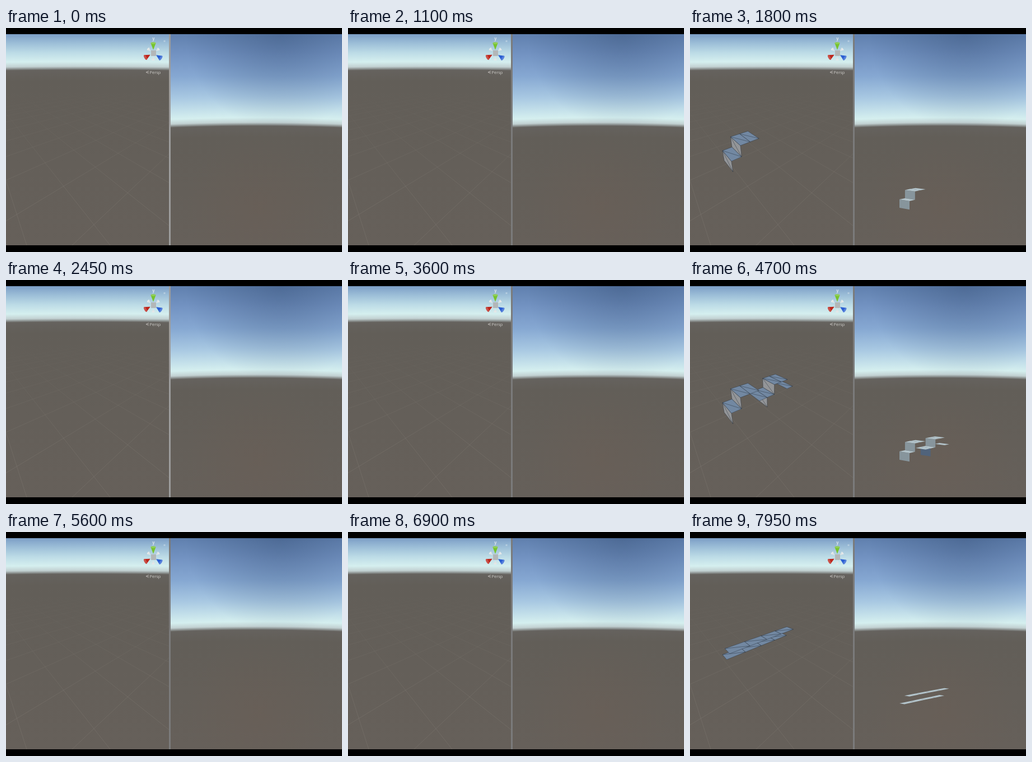
Recreate the animation shown at these times as an HTML page with a canvas. Size 600 by 400 pixels, loop 8 s.

```html
<!DOCTYPE html>
<html lang="en">
<head>
<meta charset="utf-8">
<style>
  html, body { margin: 0; width: 100%; height: 100%; overflow: hidden; background: #000; }
  canvas { display: block; width: 600px; height: 400px; }
</style>
</head>
<body>
<canvas id="stage" width="600" height="400"></canvas>
<script>
const LOOP = 8000;
const TOP = 11, BOTTOM = 388, SPLIT = 291;
const ctx = document.getElementById('stage').getContext('2d');
const backdrop = document.createElement('canvas');
backdrop.width = 600;
backdrop.height = 400;

function polygon(g, corners, fill) {
  g.beginPath();
  corners.forEach(([x, y]) => g.lineTo(x, y));
  g.closePath();
  g.fillStyle = fill;
  g.fill();
}

function line(g, a, b) {
  g.beginPath();
  g.moveTo(...a);
  g.lineTo(...b);
  g.stroke();
}

function glow(g, x, y, radius, rgb, alpha, top, bottom) {
  const fill = g.createRadialGradient(x, y, 0, x, y, radius);
  fill.addColorStop(0, `rgba(${rgb},${alpha})`);
  fill.addColorStop(1, `rgba(${rgb},0)`);
  g.fillStyle = fill;
  g.fillRect(SPLIT + 3, top, 600, bottom - top);
}

// Sky above a slightly bowed, hazy horizon.
function panorama(g, x0, x1, horizon, bow, sky) {
  const middle = (x0 + x1) / 2;
  const haze = ['#d5efef', '#c2d1d2', '#8f9594', '#65625e'];
  for (let x = x0; x < x1; x++) {
    const level = horizon + bow * ((x - middle) / (x1 - middle)) ** 2;
    const fill = g.createLinearGradient(0, TOP, 0, BOTTOM);
    const stop = (y, color) => fill.addColorStop((y - TOP) / (BOTTOM - TOP), color);
    sky.forEach((color, i) => stop(TOP + (level - 15 - TOP) * i / sky.length, color));
    haze.forEach((color, i) => stop(level - 15 + 15 * Math.sqrt(i / 3), color));
    stop(level + 20, '#625e58');
    stop(BOTTOM, '#66605a');
    g.fillStyle = fill;
    g.fillRect(x, TOP, 1, BOTTOM - TOP);
  }
}

function drawGrid(g) {
  g.save();
  g.beginPath();
  g.rect(0, 84, SPLIT, BOTTOM - 84);
  g.clip();
  g.lineWidth = 0.8;
  const fade = g.createLinearGradient(0, 110, 0, 300);
  fade.addColorStop(0, 'rgba(145,139,130,0)');
  fade.addColorStop(1, 'rgba(145,139,130,.3)');
  g.strokeStyle = fade;
  for (let i = 0; i < 10; i++) {
    line(g, [-65, 70], [37 + 149 * i, BOTTOM]);
    line(g, [455, 70], [118 - 190 * i, BOTTOM]);
  }
  g.restore();
}

// A cone whose tip points at the gizmo's centre.
function drawCone(g, degrees, reach, half, color) {
  g.save();
  g.translate(263, 45);
  g.rotate(degrees * Math.PI / 180);
  polygon(g, [[6, 0], [reach, -half], [reach, half]], color);
  g.beginPath();
  g.ellipse(reach, 0, half * 0.4, half, 0, 0, 7);
  g.fill();
  g.fillStyle = 'rgba(255,255,255,.2)';
  g.fill();
  g.restore();
}

function drawGizmo(g) {
  for (const degrees of [-140, -38, 90]) drawCone(g, degrees, 12, 2.8, '#dfe4e5');
  g.fillStyle = '#b3b7b8';
  g.fillRect(259, 40, 9, 10);
  drawCone(g, -90, 18, 4.5, '#76c42d');
  drawCone(g, 152, 16, 4.8, '#bd241a');
  drawCone(g, 33, 16, 4.6, '#2b5fd2');

  g.fillStyle = '#eef3f4';
  g.font = '9px Roboto, sans-serif';
  g.textAlign = 'center';
  g.fillText('y', 263.5, 22);
  g.textAlign = 'left';
  g.fillStyle = '#cfcdca';
  g.font = '7.5px "Open Sans", sans-serif';
  g.fillText('Persp', 256.5, 81.5);
  g.strokeStyle = '#bbb8b4';
  g.lineWidth = 0.8;
  for (const dy of [-2.5, 0, 2.5]) line(g, [250, 79], [255, 79 + dy]);
  g.fillStyle = 'rgba(225,235,240,.4)';
  g.fillRect(281.5, 22, 3, 3);
}

function drawBackdrop(g) {
  g.fillRect(0, 0, 600, 400);
  panorama(g, 0, SPLIT, 75, 1, ['#7c9ec6', '#9dbfd8', '#bcdbe6']);
  panorama(g, SPLIT + 3, 600, 175, 3, ['#6080ae', '#7494c3', '#86a8d2', '#a8c8e2']);
  glow(g, 490, TOP, 170, '42,66,104', 0.35, TOP, 181);
  glow(g, 450, 320, 130, '112,93,82', 0.25, 190, BOTTOM);
  drawGrid(g);
  drawGizmo(g);
}

// Each camera maps (along, across, up) through homogeneous columns.
const scale = (k, v) => v.map(n => n * k);
const leftCamera = {
  origin: [58, 219, 1],
  axes: [scale(0.0445, [455, 70, 1]), scale(-0.115, [-65, 73, 1]), scale(-0.037, [145, 712, 1])]
};
const rightCamera = {
  origin: [374, 306, 1],
  axes: [scale(0.01575, [1013, 172, 1]), scale(-0.0219, [-430, 172, 1]), [0, -15, 0]]
};

function project({ origin, axes }, point) {
  const [x, y, w] = origin.map((o, i) => o + axes.reduce((sum, axis, k) => sum + axis[i] * point[k], 0));
  return [x / w, y / w];
}

const paint = {
  top: ['#7288a2', '#b3c4cb'],
  wall: ['#939598', '#87959c'],
  shaded: ['#939598', '#50637b']
};

function drawFace(corners, kind) {
  const [left, right] = paint[kind];
  const wire = corners.map(p => project(leftCamera, p));
  polygon(ctx, wire, left);
  ctx.strokeStyle = 'rgba(38,46,58,.65)';
  ctx.lineWidth = 0.7;
  wire.forEach((p, i) => line(ctx, p, wire[(i + 1) % 4]));
  line(ctx, wire[0], wire[2]);
  polygon(ctx, corners.map(p => project(rightCamera, p)), right);
}

function drawTop(s, length, near, far, up) {
  drawFace([[s, near, up], [s + length, near, up], [s + length, far, up], [s, far, up]], 'top');
}

function drawWall(s, up, kind) {
  drawFace([[s, 0, up], [s, 1, up], [s, 1, up - 1], [s, 0, up - 1]], kind);
}

// A square wave along the path, painted from far to near.
function drawStairs(progress) {
  const count = Math.min(8, Math.ceil(progress * 8));
  for (let s = count - 1; s >= 0; s--) {
    const up = ((s + 1) >> 1) % 2;
    if (s % 4 < 2) drawWall(s, up, s === 4 ? 'shaded' : 'wall');
    drawTop(s, 1, 0, 1, up);
  }
}

function drawStrips() {
  for (const up of [0, 1]) {
    for (let s = 0; s < 8; s += 2) drawTop(s, 2, up / 2, up / 2 + 0.5, up);
  }
}

const BUILD = 600;
const scenes = [
  { draw: drawStairs, start: 1600, end: 2250 },
  { draw: drawStairs, start: 4100, end: 5300 },
  { draw: drawStrips, start: 7350, end: LOOP }
];

function render(t) {
  ctx.drawImage(backdrop, 0, 0);
  const lit = t < 50 || (t >= 2450 && t < 2550);
  ctx.fillStyle = lit ? '#9c9c9c' : '#7b7b7b';
  ctx.fillRect(SPLIT, TOP, 3, BOTTOM - TOP);
  const scene = scenes.find(s => t >= s.start && t < s.end);
  if (scene) scene.draw((t - scene.start + 1) / BUILD);
}

drawBackdrop(backdrop.getContext('2d'));
const began = performance.now();
function tick() {
  render((performance.now() - began) % LOOP);
  requestAnimationFrame(tick);
}
tick();
</script>
</body>
</html>
```
